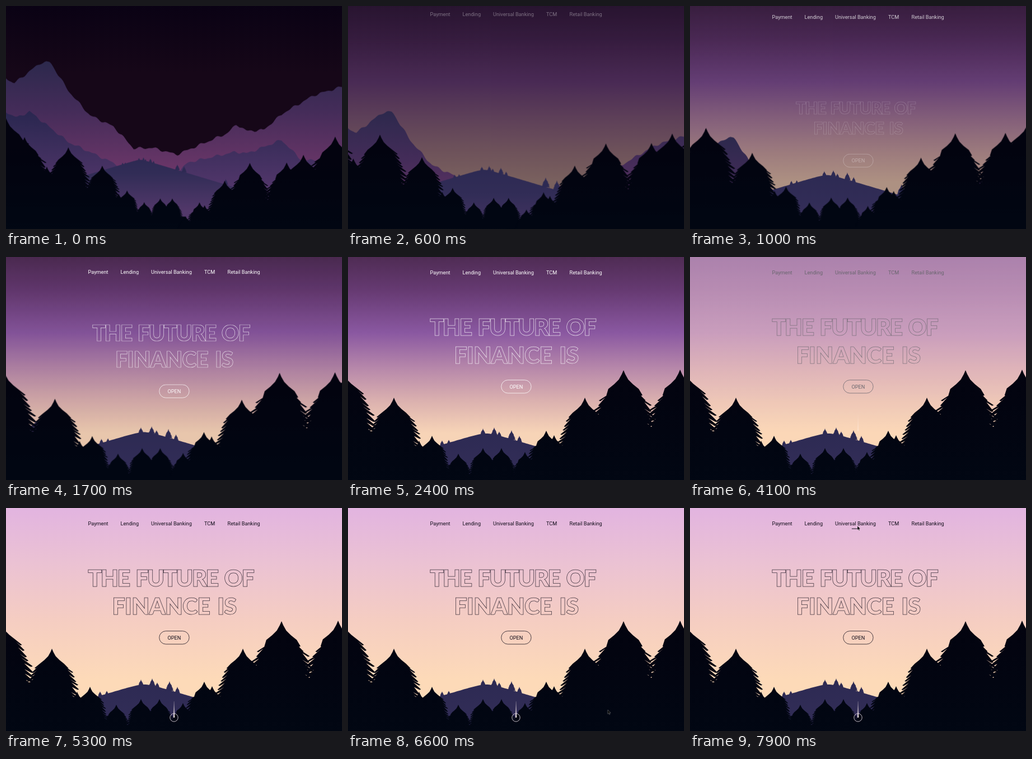
An HTML page that plays this animation: 600 px wide and 398 px high, repeating every 8000 ms.

```html
<!DOCTYPE html>
<html lang="en">
<head>
<meta charset="utf-8">
<title>The future of finance</title>
<style>
html, body { margin: 0; width: 100%; height: 100%; overflow: hidden; background: #0c0314; }
svg { display: block; width: 100vw; height: 100vh; }
text { font-family: Roboto, Arial, sans-serif; font-size: 9.2px; fill: currentColor; }
.title text {
  font-family: Lato, "Open Sans", sans-serif; font-size: 41px; font-weight: 900; word-spacing: 4px;
  fill: none; stroke: currentColor; stroke-width: .75; stroke-opacity: .8; text-anchor: middle;
}
.pill { fill: none; stroke: currentColor; stroke-width: .75; }

/* every part shares one eight-second clock */
.zoom, .sink, .dusk, .day, .ink, .late, .early, .drop, .ring, .cursor, .mark {
  animation: 8s linear infinite;
}
.zoom { animation-name: zoom; }
.sink { animation-name: sink; }
.dusk { animation-name: dusk; }
.day { animation-name: day; }
.ink { animation-name: ink; }
.late { animation-name: late; }
.early { animation-name: early; }
.drop { animation-name: drop; }
.ring { animation-name: ring; }
.cursor { animation-name: cursor; }
.mark { animation-name: mark; transform-origin: 295.5px 0; }

/* where each layer starts; all of them end at rest */
.hill  { --x: 141px;   --y: 148.5px; --s: .4; }
.left  { --x: 118.6px; --y: 121.5px; --s: .651; }
.right { --x: 115px;   --y: 148.5px; --s: .651; }
.title { --x: 0px; --y: 285px; --s: .14; transform-origin: 300px 0; }
.nav   { --x: 0px; --y: -24px; --s: 1; }
.open  { --x: 0px; --y: 138px; --s: 1; }

@keyframes zoom {
  0% {
    transform: translate(var(--x), var(--y)) scale(var(--s));
    animation-timing-function: cubic-bezier(.33, .6, .67, 1);
  }
  27.5%, 100% { transform: translate(0px, 0px) scale(1); }
}
@keyframes sink {
  0% { transform: translateY(0); animation-timing-function: cubic-bezier(.33, .6, .67, 1); }
  27.5%, 100% { transform: translateY(200px); }
}
@keyframes dusk {
  0% { opacity: 0; animation-timing-function: cubic-bezier(.33, .6, .67, 1); }
  27.5%, 100% { opacity: 1; }
}
@keyframes day {
  0%, 44.4% { opacity: 0; animation-timing-function: ease-in-out; }
  56.25%, 100% { opacity: 1; }
}
@keyframes ink {
  0%, 44.4% { color: #fff; animation-timing-function: ease-in-out; }
  56.25%, 100% { color: #120d1a; }
}
@keyframes late {
  0%, 7.5% { opacity: 0; }
  21.9%, 100% { opacity: 1; }
}
@keyframes early {
  0%, 2.5% { opacity: 0; }
  15.5%, 100% { opacity: 1; }
}
@keyframes drop {
  0%, 48.75% { transform: translateY(-100px); opacity: 0; animation-timing-function: cubic-bezier(.33, .67, .67, 1); }
  61.25%, 100% { transform: translateY(0); opacity: 1; }
}
@keyframes ring {
  0%, 57% { opacity: 0; }
  64%, 100% { opacity: 1; }
}
@keyframes cursor {
  0%, 69.9% { transform: translate(640px, 400px); }
  70% { transform: translate(583px, 381px); animation-timing-function: ease-out; }
  80% { transform: translate(465px, 361px); }
  90.6% { transform: translate(460px, 358px); animation-timing-function: ease-in-out; }
  98.1%, 100% { transform: translate(299px, 32px); }
}
@keyframes mark {
  0%, 98.125% { transform: scaleX(0); }
  100% { transform: scaleX(1); }
}
</style>
</head>
<body>
<svg viewBox="0 0 600 398" preserveAspectRatio="none">
  <defs>
    <linearGradient id="night" x2="0" y2="1">
      <stop offset="0" stop-color="#0a0214"/>
      <stop offset=".3" stop-color="#160718"/>
    </linearGradient>
    <linearGradient id="evening" x2="0" y2="1">
      <stop offset="0" stop-color="#4f2c54"/>
      <stop offset=".15" stop-color="#663a72"/>
      <stop offset=".34" stop-color="#8a58a1"/>
      <stop offset=".5" stop-color="#b788aa"/>
      <stop offset=".65" stop-color="#dcb2af"/>
      <stop offset=".79" stop-color="#f7d4b7"/>
    </linearGradient>
    <linearGradient id="morning" x2="0" y2="1">
      <stop offset="0" stop-color="#e2b4e0"/>
      <stop offset=".25" stop-color="#ebc2d3"/>
      <stop offset=".5" stop-color="#f5cdc2"/>
      <stop offset=".77" stop-color="#fddab8"/>
    </linearGradient>
    <linearGradient id="farFill" gradientUnits="userSpaceOnUse" x2="0" y1="100" y2="290">
      <stop offset="0" stop-color="#2d294d"/>
      <stop offset=".45" stop-color="#442c59"/>
      <stop offset="1" stop-color="#6a3668"/>
    </linearGradient>
    <linearGradient id="midFill" gradientUnits="userSpaceOnUse" x2="0" y1="190" y2="330">
      <stop offset="0" stop-color="#2a2750"/>
      <stop offset="1" stop-color="#54376c"/>
    </linearGradient>
    <linearGradient id="hillFill" gradientUnits="userSpaceOnUse" x2="0" y1="310" y2="540">
      <stop offset="0" stop-color="#2d2a53"/>
      <stop offset=".3" stop-color="#322d57"/>
      <stop offset="1" stop-color="#52386a"/>
    </linearGradient>
    <linearGradient id="woodFill" gradientUnits="userSpaceOnUse" x2="0" y1="200" y2="420">
      <stop offset="0" stop-color="#03030f"/>
      <stop offset="1" stop-color="#010713"/>
    </linearGradient>
    <linearGradient id="beam" x2="0" y2="1">
      <stop offset="0" stop-color="#fff3f0" stop-opacity=".35"/>
      <stop offset="1" stop-color="#fff3f0"/>
    </linearGradient>
  </defs>

  <rect width="600" height="398" fill="url(#night)"/>
  <rect class="dusk" width="600" height="398" fill="url(#evening)"/>
  <rect class="day" width="600" height="398" fill="url(#morning)"/>

  <g class="sink">
    <path id="far" fill="url(#farFill)"/>
    <path id="midLeft" fill="url(#midFill)"/>
    <path id="midRight" fill="url(#midFill)"/>
  </g>
  <g class="zoom hill">
    <path id="hill" fill="url(#hillFill)"/>
    <path id="hillTrees" fill="#2d2a53"/>
  </g>
  <g class="zoom left" fill="url(#woodFill)">
    <path d="M-300 200L-130 225L-40 290L45 312L110 335L150 362L190 386L310 391V700H-300Z"/>
    <path id="leftTrees"/>
  </g>
  <g class="zoom right" fill="url(#woodFill)">
    <path d="M850 230L690 280L540 306L440 306L390 345L345 368L310 390L270 391V700H850Z"/>
    <path id="rightTrees"/>
  </g>

  <g class="ink">
    <g class="early"><g class="zoom nav">
      <text x="146.5" y="31">Payment</text>
      <text x="204.5" y="31">Lending</text>
      <text x="259" y="31">Universal Banking</text>
      <text x="354" y="31">TCM</text>
      <text x="395.5" y="31">Retail Banking</text>
    </g></g>
    <g class="late"><g class="zoom title">
      <text x="294" y="139.7" letter-spacing="-2.2">THE FUTURE OF</text>
      <text x="300.5" y="189.7" letter-spacing="-.6">FINANCE IS</text>
    </g></g>
    <g class="late"><g class="zoom open">
      <rect class="pill" x="273.7" y="219.6" width="53.4" height="23.4" rx="11.7"/>
      <text x="300.4" y="234.5" text-anchor="middle">OPEN</text>
    </g></g>
  </g>

  <path class="drop" d="M299.8 345H300.4L301.2 374H299Z" fill="url(#beam)"/>
  <circle class="ring" cx="300" cy="374" r="7.2" fill="none" stroke="#f3e6ec" stroke-width=".8"/>

  <rect class="mark" x="276" y="36.5" width="39" height="1" fill="#120d1a"/>
  <path class="cursor" d="M0 0V7.2L1.7 5.7L2.8 8.3L4 7.8L2.9 5.3H5.2Z" fill="#000" stroke="#fff" stroke-width=".3"/>
</svg>
<script>
const setPath = (id, d) => document.getElementById(id).setAttribute('d', d);
const parse = list => list.split(' ').map(s => s.split(',').map(Number));
const noise = n => { const v = Math.sin(n * 12.9898) * 43758.5453; return v - Math.floor(v); };

// Fills everything below the curve y = f(x).
function terrain(id, from, to, f) {
  let d = `M${from} 900`;
  for (let x = from; x <= to; x += 3) d += `L${x} ${f(x).toFixed(1)}`;
  setPath(id, `${d}V900Z`);
}

// Slopes between a few peaks and valleys, roughened by two ripples.
function mountain(id, list) {
  const p = parse(list);
  const height = x => {
    const i = Math.max(1, p.findIndex(q => q[0] >= x));
    const [[a, b], [c, d]] = [p[i - 1], p[i]];
    return b + (d - b) * (x - a) / (c - a) + 1.6 * Math.sin(x * .23) + Math.sin(x * .41 + 1);
  };
  terrain(id, p[0][0], p[p.length - 1][0], height);
}

// One half of a spruce: a hollow spire, then drooping branch tips that widen downwards.
function half(tiers, seed) {
  const pts = [[3, 7], [8, 16], [16, 24], [26, 32]];
  for (let i = 0; i < tiers; i++) {
    const w = 67 - 29 * Math.exp(-i / 3) - 9 * noise(seed + i);
    const y = 41 + 9 * i + 3 * noise(seed - i);
    pts.push([w, y], [w - 3, y + 1], [w * .74, y - 5]);
  }
  return pts;
}

function tree(x, y, size, tiers, slim) {
  const at = dir => ([a, b]) => `${(x + dir * a * size * slim).toFixed(1)} ${(y + b * size).toFixed(1)}`;
  const right = half(tiers, x + 1).map(at(1));
  const left = half(tiers, x + 2).map(at(-1)).reverse();
  return `M${x} ${y}L${[...right, ...left].join('L')}Z`;
}

// Tree tops only: each size follows from the drop to the ground.
const forest = (id, list, size, tiers, slim) =>
  setPath(id, parse(list).map(([x, y]) => tree(x, y, size(x, y), tiers, slim)).join(''));

const hill = x => 311 + Math.hypot(4, .3 * (x - 247));
const front = (x, y) => (451 - y) / 238;
const onHill = (x, y) => (hill(x) + 2 - y) / 77;

mountain('far', '-6,124 14,138 62,101 79,100 112,152 150,195 192,215 228,254 262,253 305,265 395,227 412,211 ' +
  '430,223 460,221 495,191 550,159 606,142');
mountain('midLeft', '-6,186 20,199 42,188 112,243 190,279 280,330');
mountain('midRight', '294,310 325,279 410,260 430,263 492,239 530,277 575,270 606,285');
terrain('hill', -120, 780, hill);

forest('hillTrees', '168,327 180,326 241,306 261,304 270,311 292,309 306,319 412,335 442,343 628,400', onHill, 5, .6);
forest('leftTrees', '-182,121 -131,173 -70,254 -11,201 82,251 127,328 150,319 197,351 241,341 274,341', front, 13, 1);
forest('rightTrees', '316,348 354,310 368,318 423,251 492,202 593,201 639,180 726,130', front, 13, 1);
</script>
</body>
</html>
```
